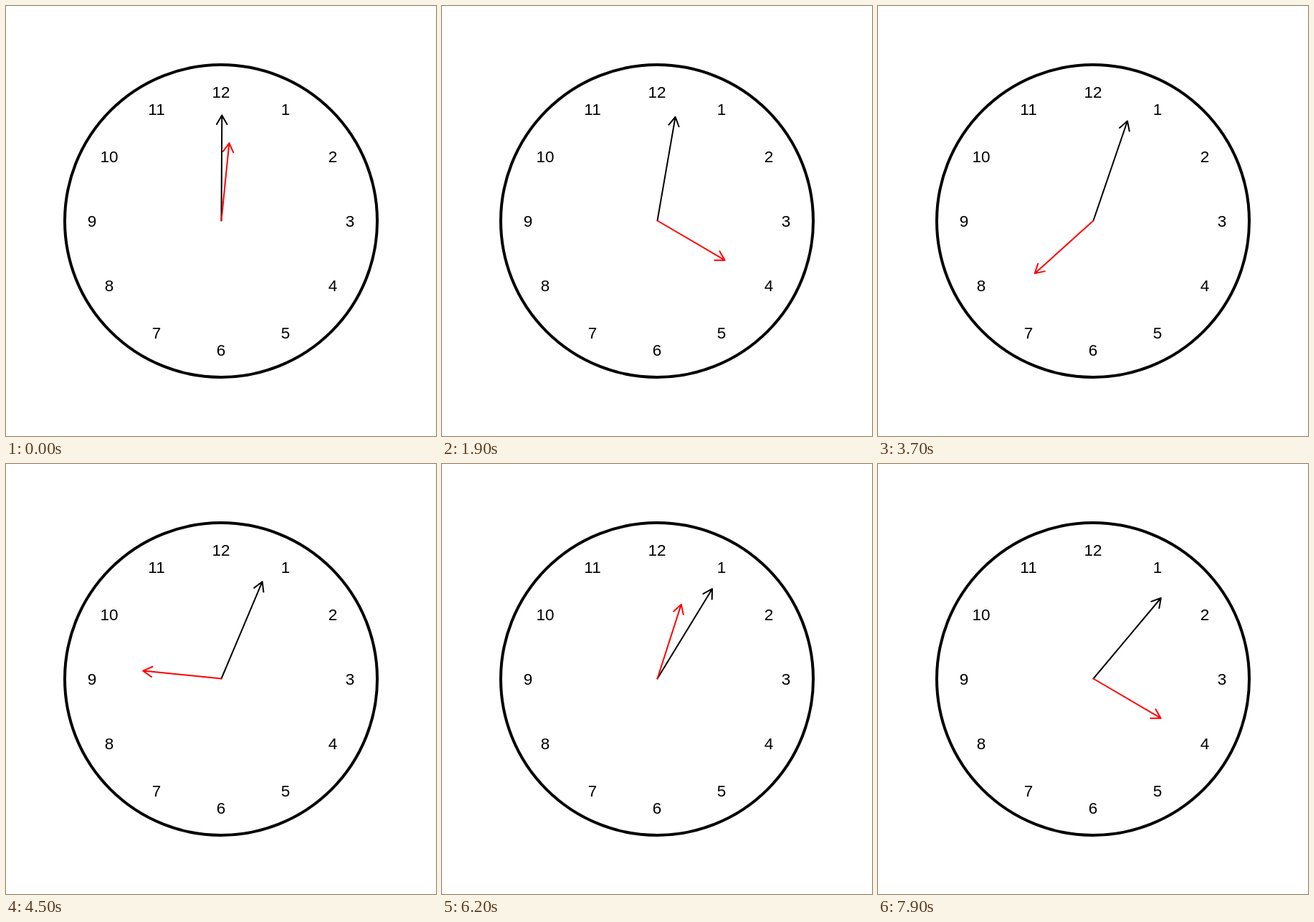
These frames come from a looping animation (600x600 px, 8000 ms). An HTML page:

```html
<!DOCTYPE html>
<html lang="en">
<head>
<meta charset="utf-8">
<title>Clock</title>
<style>
  html, body { margin: 0; width: 100%; height: 100%; overflow: hidden; background: #fff; }
  svg { display: block; width: 100vw; height: 100vh; }
  text { font: 22.5px "Liberation Sans", Arial, sans-serif; text-anchor: middle; }
  path { fill: none; stroke-width: 2; stroke-linecap: round; stroke-linejoin: round; }
</style>
</head>
<body>
<svg viewBox="0 0 600 600">
  <circle cx="300" cy="300" r="218" fill="none" stroke="#000" stroke-width="4"/>
  <g id="numerals"></g>
  <path id="slow" stroke="#000"/>
  <path id="fast" stroke="#f00"/>
</svg>
<script>
const LOOP = 8000, STEP = 100;
const CENTER = 300, BARB = 14.4;
const byId = id => document.getElementById(id);

// Angles in degrees, clockwise from twelve o'clock.
function polar(radius, degrees, x = CENTER, y = CENTER) {
  const a = degrees * Math.PI / 180;
  return [x + radius * Math.sin(a), y - radius * Math.cos(a)];
}

const point = p => p.map(v => v.toFixed(2)).join(' ');

function drawHand(path, length, degrees) {
  const tip = polar(length, degrees);
  const [left, right] = [150, 210].map(turn => polar(BARB, degrees + turn, ...tip));
  path.setAttribute('d',
    `M300.5 299.5L${point(tip)}M${point(left)}L${point(tip)}L${point(right)}`);
}

for (let hour = 1; hour <= 12; hour++) {
  const [x, y] = polar(180, hour * 30);
  const label = document.createElementNS('http://www.w3.org/2000/svg', 'text');
  label.setAttribute('x', x);
  label.setAttribute('y', y + 8);
  label.textContent = hour;
  byId('numerals').append(label);
}

function render(time) {
  const tick = Math.floor((time % LOOP) / STEP) + 1;
  drawHand(byId('slow'), 147.5, tick * 0.5);
  drawHand(byId('fast'), 109.3, tick * 6);
}

const start = performance.now();
function frame() {
  render(performance.now() - start);
  requestAnimationFrame(frame);
}
frame();
</script>
</body>
</html>
```
